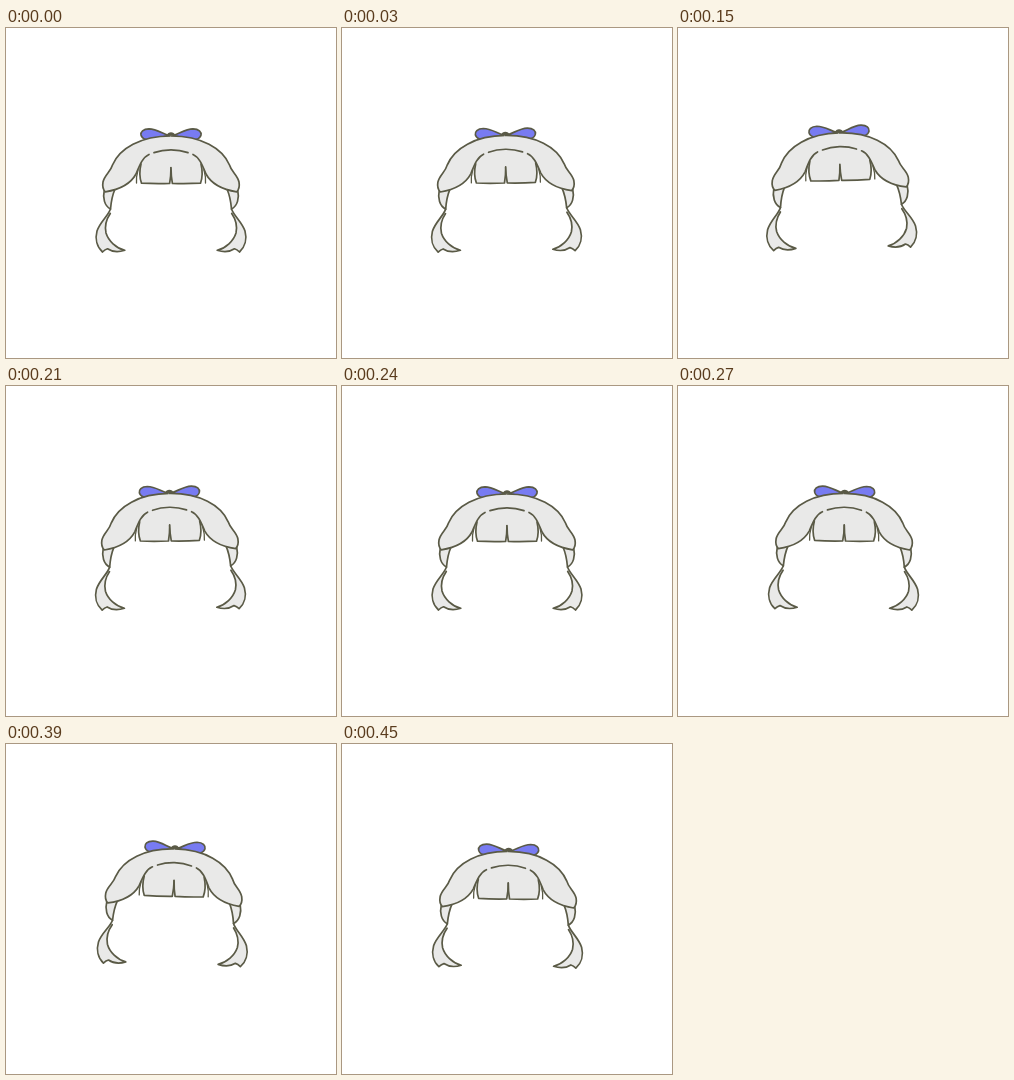
Recreate the animation shown at these times as an HTML page. Size 330x330 px, loop 0.48 s.

```html
<!DOCTYPE html>
<html>
<head>
<meta charset="utf-8">
<style>
  html, body { margin: 0; width: 100%; height: 100%; overflow: hidden; background: #fff; }
  svg { display: block; width: 100vw; height: 100vh; }
  .line { fill: none; stroke: #5a5a46; stroke-width: 1.7; stroke-linecap: round; stroke-linejoin: round; }
  .hair { fill: #e9e9e8; }
  .bow { fill: #787bf2; }
</style>
</head>
<body>
<svg viewBox="0 0 330 330">
  <defs>
    <g id="half" class="line">
      <!-- tail -->
      <path class="hair" d="M104.500 181C102 188 94 194 91 203C88.800 211 91 219 96.500 224C98 222.500 99.500 221.300 101.500 220.800C106 223.800 112 224.500 118.800 222.300C110 220 102.500 213 100 205C98.500 198 100.500 191 104.300 185.500"/>
      <!-- lower curl -->
      <path class="hair" d="M98.300 162C96.500 170 98.500 178 104.500 181C105 175 106 168 109 161Z"/>
      <!-- bow loop -->
      <path class="bow" d="M163 107.500C157 106 151 101 143 100.800C137 100.800 134.500 104 135 107C136 111 141 112.500 147 111.500C152 110.500 157 108.500 163 107.500Z"/>
      <!-- band and fringe -->
      <path class="hair" stroke="none" d="M166 108C151 108 138 110.500 127 116.300C116 122 109.500 130 106.500 137C104.500 144 98.500 147 97 154C96.300 158 97 161.500 99.300 163.800C111 162 124 157 130 145L134.500 139C133.500 145 134 151 135.500 155.200Q149 156 163.600 155.500L165 139H166Z"/>
      <path d="M165 108C151 108 138 110.500 127 116.300C116 122 109.500 130 106.500 137C104.500 144 98.500 147 97 154C96.300 158 97 161.500 99.300 163.800C111 162 124 157 130 146C133 139 136 129.500 143 126.500"/>
      <path d="M135 136C133.300 143 134 151 135.500 155.200Q149 156 163.600 155.500Q165 148 165 139.500"/>
      <path d="M132 142Q130 149 130.500 155" stroke-width="1.3"/>
    </g>
  </defs>
  <g id="wig">
    <use href="#half"/>
    <use href="#half" transform="matrix(-1 0 0 1 330 0)"/>
    <path class="line" d="M148 124.600Q156 121.800 165 121.800T182 124.600"/>
    <path d="M160.500 107.500Q162 104.300 165 104.300T169.500 107.500Z" fill="#5a5a46"/>
  </g>
</svg>
<script>
  const LOOP = 480, STEP = 30, TILT = 1.63, LIFT = 3.7;
  const wig = document.getElementById('wig');

  function draw(now) {
    const t = Math.floor((now % LOOP) / STEP) * STEP;
    const sway = Math.sin(2 * Math.PI * t / LOOP);
    const lift = -LIFT * sway * sway;
    wig.setAttribute('transform', `translate(0 ${lift}) rotate(${-TILT * sway} 165 258)`);
  }

  let start;
  function tick(now) {
    start ??= now;
    draw(Math.max(0, now - start));
    requestAnimationFrame(tick);
  }
  draw(0);
  requestAnimationFrame(tick);
</script>
</body>
</html>
```
